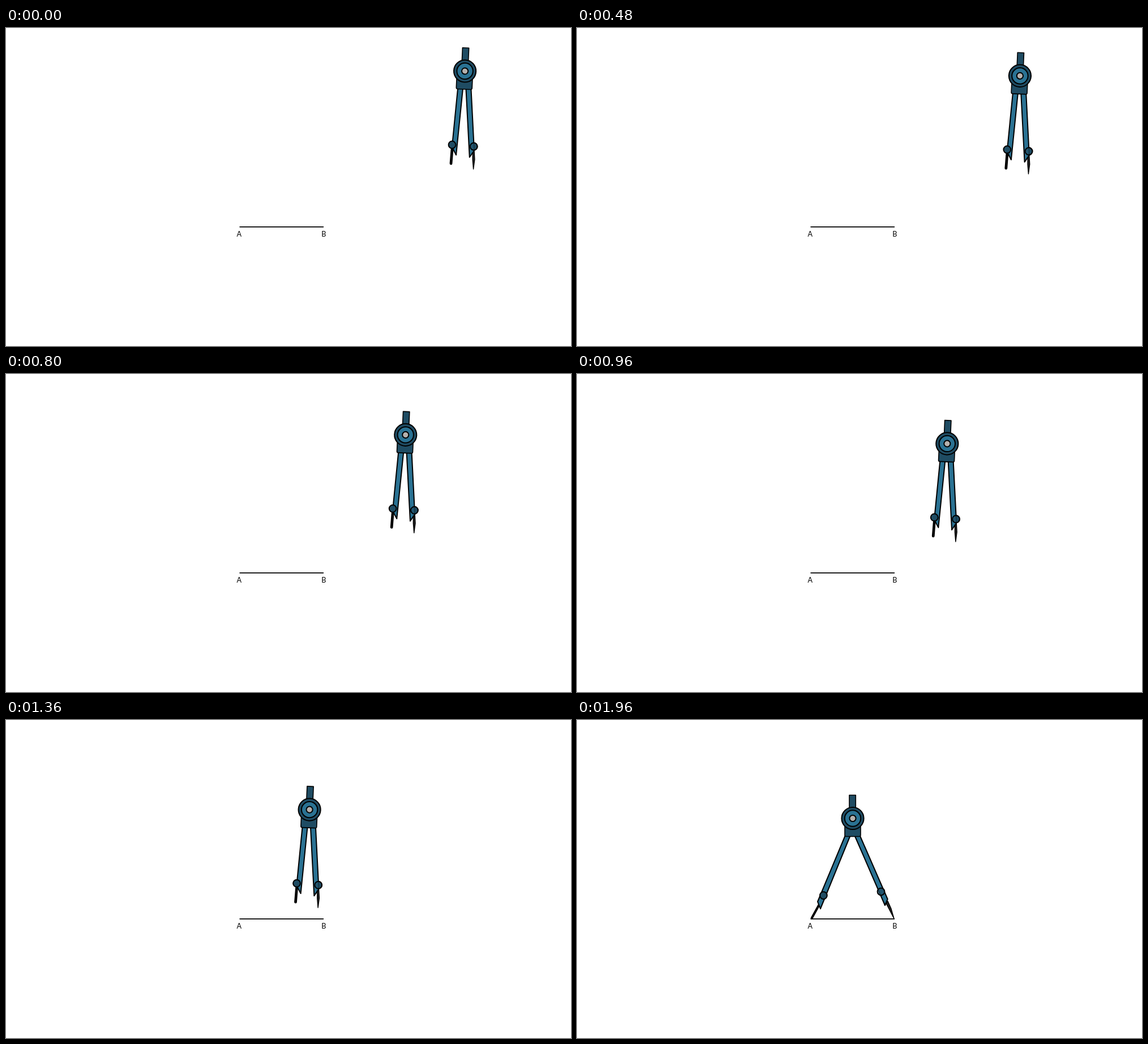
An HTML page that plays this animation: 998x561 px, repeating every 2000 ms.

```html
<!DOCTYPE html>
<html>
<head>
<meta charset="utf-8">
<style>
  html, body { margin: 0; width: 100%; height: 100%; overflow: hidden; background: #fff; }
  svg { display: block; }
  .part { stroke: #000; stroke-width: 2; stroke-linejoin: round; }
  .dark { fill: #1f4c63; }
  .light { fill: #2a7293; }
  text { font: 12.6px Lato, "Open Sans", sans-serif; text-anchor: middle; }
</style>
</head>
<body>
<svg width="998" height="561" viewBox="0 0 998 561">
  <defs>
    <g id="head" class="part">
      <path class="dark" stroke-width="1.6" d="M-6-41H5.3V-17H-6z"/>
      <path class="dark" stroke-width="1.6" d="M-14 12H14V29.5Q14 32 11.5 32H-11.5Q-14 32-14 29.5z"/>
      <circle class="dark" r="19.6"/>
      <circle class="light" r="14.2"/>
      <circle fill="#b5b1ae" r="5.6"/>
    </g>
  </defs>
  <path d="M412.5 350.8H561" stroke="#000" stroke-width="1.7"/>
  <text x="411.8" y="367.8">A</text>
  <text x="561.3" y="367.8">B</text>

  <g id="closed">
    <g class="part">
      <path d="M-22.6 138L-24.6 163" stroke-width="4.8" stroke-linecap="round" style="stroke-width:4.8"/>
      <path class="light" d="M-12.5 30H-3.5L-15.5 148L-22.8 134z"/>
      <circle class="dark" cx="-22.6" cy="130" r="6.4"/>
      <path fill="#222" style="stroke-width:1.4" d="M13.7 145L16.3 138L17.3 156L15 173L13.6 156z"/>
      <circle class="dark" cx="15.6" cy="133" r="6.4"/>
      <path class="light" d="M1.8 30H10.8L16.4 140L8.2 152z"/>
      <circle class="dark" cx="15.6" cy="133" r="6.4" fill-opacity=".75"/>
    </g>
    <use href="#head" transform="rotate(2.5)"/>
  </g>

  <g id="open" transform="translate(487 173.5)">
    <g class="part">
      <path d="M-58 150L-72.3 176" stroke-linecap="round" style="stroke-width:4"/>
      <path class="light" d="M-13.5 31H-4.5L-57 159.5L-62 147z"/>
      <circle class="dark" cx="-51.6" cy="136" r="6.4"/>
      <path fill="#222" style="stroke-width:1.4" d="M59 150L62 146L67.8 159L73 177z"/>
      <path class="light" d="M3.7 31H13L61.7 142.5L57 153.5z"/>
      <circle class="dark" cx="50" cy="129.3" r="6.4" fill-opacity=".75"/>
    </g>
    <use href="#head"/>
  </g>
</svg>
<script>
  const closed = document.getElementById("closed");
  const open = document.getElementById("open");
  const LOOP = 2000, STEP = 40, OPEN_AT = 1960;

  function ease(u) {
    u = Math.min(1, Math.max(0, u));
    const a = u ** 1.75, b = (1 - u) ** 1.75;
    return a / (a + b);
  }

  function draw(now) {
    const t = Math.floor((now % LOOP) / STEP) * STEP;
    const p = ease((t - 130) / 1690);
    const isOpen = t >= OPEN_AT;
    closed.setAttribute("transform", `translate(${810.6 - 323.6 * p} ${76 + 96.8 * p})`);
    closed.style.display = isOpen ? "none" : "";
    open.style.display = isOpen ? "" : "none";
  }

  const start = performance.now();
  function tick() {
    draw(performance.now() - start);
    requestAnimationFrame(tick);
  }
  tick();
</script>
</body>
</html>
```
